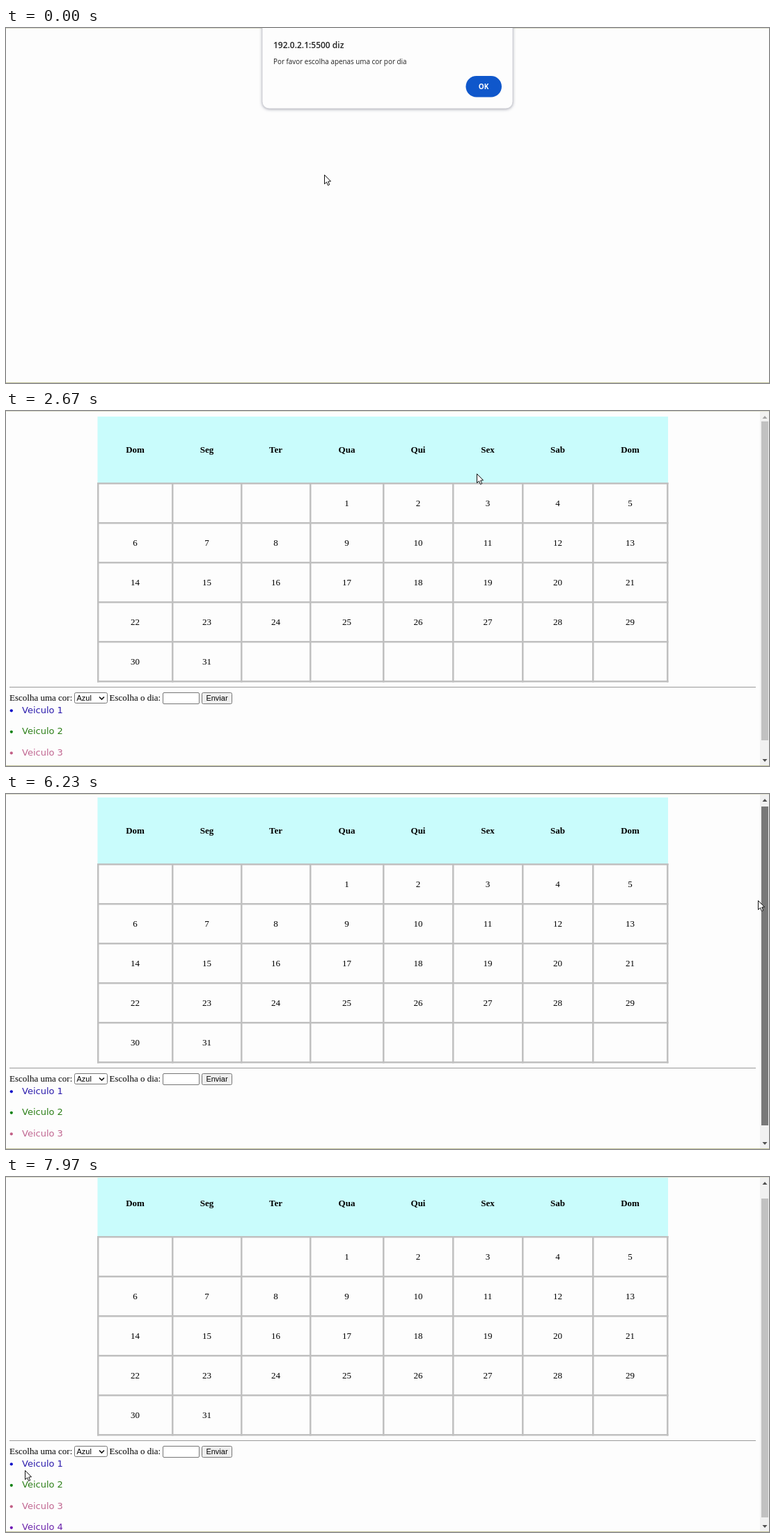
These frames come from a looping animation (1096 px wide and 511 px high, 8000 ms). An HTML page with a canvas:

```html
<!DOCTYPE html>
<html lang="pt">
<head>
<meta charset="utf-8">
<title>Calendário</title>
<style>
html, body { margin: 0; width: 100%; height: 100%; overflow: hidden; background: #fdfdfd; }
canvas { display: block; }
</style>
</head>
<body>
<canvas id="stage" width="1096" height="511"></canvas>
<script>
const W = 1096, H = 511, LOOP = 8000;
const ctx = document.getElementById('stage').getContext('2d');

const SERIF = '"Liberation Serif", "Times New Roman", serif';
const ARIAL = '"Liberation Sans", Arial, sans-serif';
const UI = '"Open Sans", "Noto Sans", sans-serif';
const LIST = '"DejaVu Sans", Verdana, sans-serif';

const PAPER = '#fdfdfd';
const DISMISS = 2560;            // dialog closes, page appears
const DRAG = [5920, 6760];       // scrollbar thumb is held

// [time, x, y] of the pointer tip
const POINTER = [
  [0, 457, 211], [740, 457, 211], [1100, 602, 153], [1670, 622, 172],
  [2400, 676, 90], [3300, 676, 90], [4600, 735, 220], [5080, 735, 220],
  [5820, 1081, 149], [5960, 1081, 149], [6230, 1080, 153], [6600, 1077, 166],
  [6800, 1077, 166], [7640, 27, 422], [8000, 27, 422]
];
// [time, offset] of the page scroll
const SCROLL = [[0, 0], [5980, 0], [6230, 3], [6600, 18], [8000, 18]];

const COLS = [132, 239, 338, 437, 542, 642, 742, 843, 950];
const DAYS = ['Dom', 'Seg', 'Ter', 'Qua', 'Qui', 'Sex', 'Sab', 'Dom'];
const ROW_TOP = 104, ROW_H = 57, ROWS = 5;
const VEHICLES = [
  ['#0808c8', '#2a1aac'], ['#108212', '#2c7f18'],
  ['#c25f86', '#c06590'], ['#6d12b4', '#6a22aa']
];

function sample(keys, t) {
  let i = 1;
  while (i < keys.length - 1 && t > keys[i][0]) i++;
  const a = keys[i - 1], b = keys[i];
  const p = Math.min(1, Math.max(0, (t - a[0]) / (b[0] - a[0])));
  const e = p * p * (3 - 2 * p);
  return a.slice(1).map((v, k) => v + (b[k + 1] - v) * e);
}

function rect(x, y, w, h, color) {
  ctx.fillStyle = color;
  ctx.fillRect(x, y, w, h);
}

function text(str, x, y, font, color = '#000', align = 'left') {
  ctx.font = font;
  ctx.fillStyle = color;
  ctx.textAlign = align;
  ctx.fillText(str, x, y);
}

function poly(points, color) {
  ctx.beginPath();
  points.forEach(([x, y]) => ctx.lineTo(x, y));
  ctx.closePath();
  ctx.fillStyle = color;
  ctx.fill();
}

function box(x, y, w, h, r, fill, stroke) {
  ctx.beginPath();
  ctx.roundRect(x, y, w, h, r);
  ctx.fillStyle = fill;
  ctx.fill();
  if (stroke) {
    ctx.strokeStyle = stroke;
    ctx.lineWidth = 1;
    ctx.stroke();
  }
}

function drawDialog() {
  ctx.save();
  ctx.shadowColor = 'rgba(60, 64, 90, 0.5)';
  ctx.shadowBlur = 4;
  ctx.shadowOffsetY = 1;
  box(368, -12, 360, 128, 10, PAPER);
  ctx.restore();
  box(368, -12, 360, 128, 10, PAPER, '#d2d3d8');
  text('192.0.2.1:5500 diz', 384, 29, '600 12px ' + UI, '#222');
  text('Por favor escolha apenas uma cor por dia', 384, 52, '9.9px ' + UI, '#222');
  box(660.5, 69, 51.5, 30.5, 15.25, '#0f57cb');
  text('OK', 686, 88, '700 10px ' + UI, '#fff', 'center');
}

function drawCalendar() {
  rect(131.5, 8, 819.5, 96, '#c9fcfc');
  const height = ROW_H * ROWS;
  for (const x of COLS) rect(x - 1, ROW_TOP - 1, 2.5, height + 2.5, '#c0c0c0');
  for (let r = 0; r <= ROWS; r++) {
    rect(131, ROW_TOP - 1 + r * ROW_H, 820.5, 2.5, '#c0c0c0');
  }
  DAYS.forEach((day, c) => {
    const x = (COLS[c] + COLS[c + 1]) / 2;
    text(day, x, 60, 'bold 13px ' + SERIF, '#000', 'center');
    for (let r = 0; r < ROWS; r++) {
      // the first row starts at column 3 and ends on 5
      const n = r ? r * 8 + c - 2 : c - 2;
      if (n > 0 && n <= 31) {
        text(n, x, 137 + r * ROW_H, '13px ' + SERIF, '#000', 'center');
      }
    }
  });
}

function drawForm() {
  rect(5, 397, 1072, 1, '#9a9a9a');
  text('Escolha uma cor:', 5, 417, '13px ' + SERIF);
  box(98.5, 405.5, 47, 15, 2, '#fff', '#767676');
  text('Azul', 101.5, 417, '11px ' + ARIAL);
  ctx.beginPath();
  ctx.moveTo(134, 411.5);
  ctx.lineTo(137.5, 415);
  ctx.lineTo(141, 411.5);
  ctx.strokeStyle = '#111';
  ctx.lineWidth = 1.6;
  ctx.stroke();
  text('Escolha o dia:', 148.5, 417, '13px ' + SERIF);
  box(225.5, 405.5, 52, 16, 1.5, '#fff', '#767676');
  box(281.5, 405.5, 43, 16, 2, '#efefef', '#767676');
  text('Enviar', 303, 417, '11px ' + ARIAL, '#000', 'center');
}

function drawVehicles() {
  VEHICLES.forEach(([dot, ink], i) => {
    const y = 434.7 + i * 30.5;
    ctx.beginPath();
    ctx.arc(7.8, y - 3.4, 2.1, 0, Math.PI * 2);
    ctx.fillStyle = dot;
    ctx.fill();
    text('Veiculo ' + (i + 1), 23, y, '13px ' + LIST, ink);
  });
}

function drawScrollbar(scroll, held) {
  rect(1083, 1, 13, 509, '#f1f1f1');
  const top = 15 + Math.round(scroll * 0.89);
  rect(1085, top, 10, 459, held ? '#787878' : '#c1c1c1');
  poly([[1086.5, 11], [1090, 7], [1093.5, 11]], scroll ? '#505050' : '#a3a3a3');
  poly([[1086.5, 501], [1090, 505], [1093.5, 501]], '#505050');
}

function drawPage(t) {
  const scroll = Math.round(sample(SCROLL, t)[0]);
  ctx.save();
  ctx.beginPath();
  ctx.rect(0, 1, W, H - 2);
  ctx.clip();
  ctx.translate(0, -scroll);
  drawCalendar();
  drawForm();
  drawVehicles();
  ctx.restore();
  drawScrollbar(scroll, t >= DRAG[0] && t < DRAG[1]);
}

function drawPointer(t) {
  const [x, y] = sample(POINTER, t).map(Math.round);
  ctx.save();
  ctx.translate(x + 0.5, y + 0.5);
  poly([[0, 0], [0, 13], [3, 10.3], [5, 15], [7.2, 14], [5.2, 9.5], [9, 9.2]], '#fff');
  ctx.strokeStyle = '#111';
  ctx.lineWidth = 1;
  ctx.stroke();
  ctx.restore();
}

function draw(t) {
  rect(0, 0, W, H, PAPER);
  if (t < DISMISS) {
    rect(0, 0, W, 1, '#dedece');
    drawDialog();
  } else {
    rect(0, 0, W, 1, '#dedece');
    drawPage(t);
  }
  rect(0, H - 1, W, 1, '#c3c39c');
  drawPointer(t);
}

const start = performance.now();
function tick() {
  draw((performance.now() - start) % LOOP);
  requestAnimationFrame(tick);
}
tick();
</script>
</body>
</html>
```
